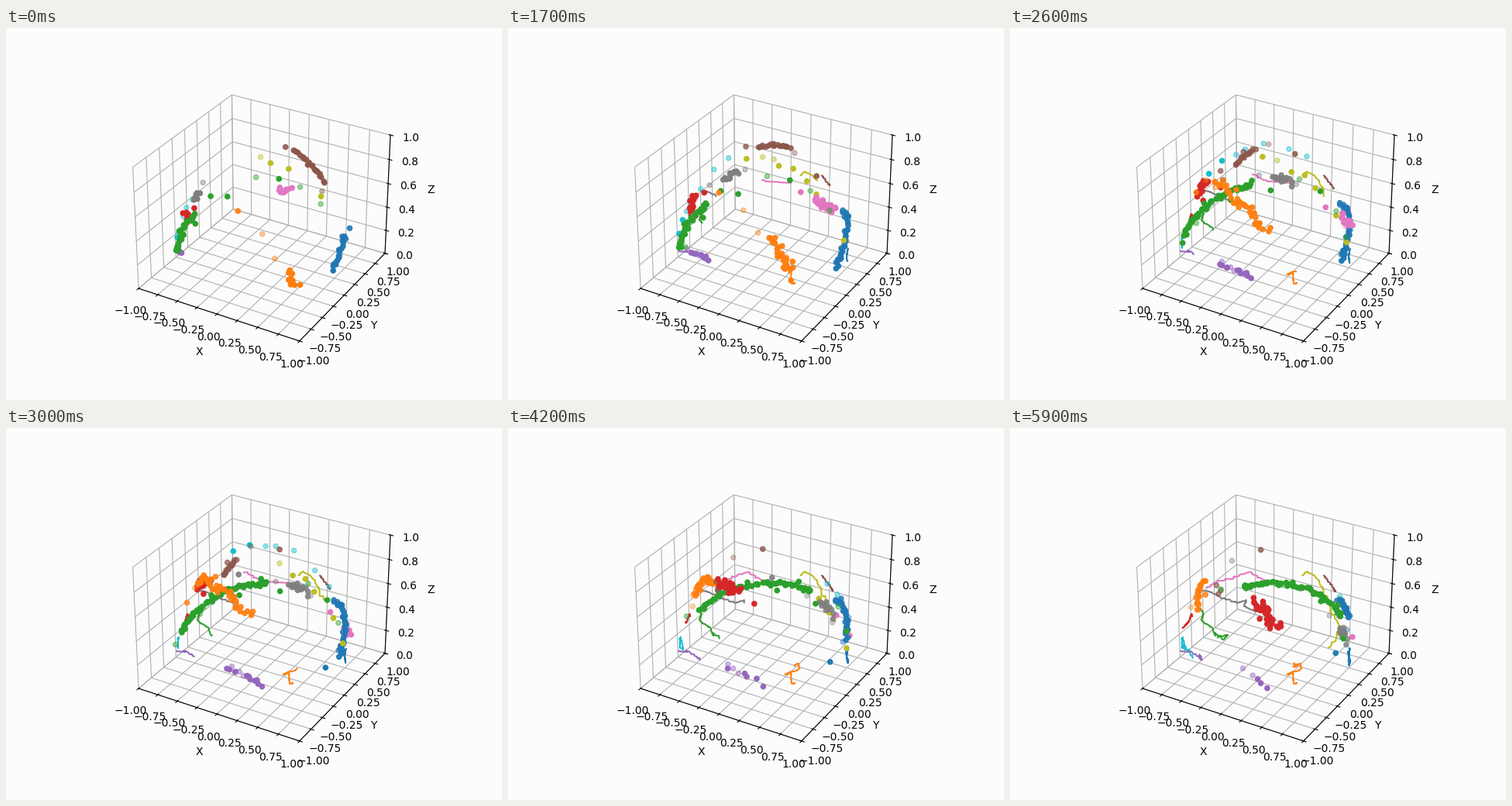
These frames come from a looping animation (640 by 480 pixels, 6 s). A matplotlib script:

```python
import numpy as np
import matplotlib.pyplot as plt
from matplotlib.animation import FuncAnimation
from matplotlib.colors import to_rgb

FRAMES = 60
PAPER = "#fcfcfc"
GOLDEN = 0.618034

# Default 3D camera: view axes, size of one data unit, pixels per view unit
ELEV, AZIM = np.radians(30), np.radians(-60)
EYE = np.array([np.cos(ELEV) * np.cos(AZIM), np.cos(ELEV) * np.sin(AZIM), np.sin(ELEV)])
RIGHT = np.array([-np.sin(AZIM), np.cos(AZIM), 0])
UP = np.cross(EYE, RIGHT)
UNIT = np.array([2, 2, 3]) * 1.90569 / np.sqrt(41)
ZOOM, CX, CY = 1997.8, 333.0, 237.4


def to_sphere(xy):
    """Lift stage points onto the near side of the unit sphere."""
    a = (xy[:, :1] - CX) / ZOOM
    b = (CY - xy[:, 1:]) / ZOOM
    ray = (a * RIGHT + b * UP - EYE) / UNIT
    start = 10 * EYE / UNIT + [0, 0, 0.5]
    qa = (ray ** 2).sum(1)
    qb = ray @ start
    root = np.sqrt(np.maximum(qb ** 2 - qa * (start @ start - 1), 0))
    q = start - ((qb + root) / qa)[:, None] * ray
    return q / np.linalg.norm(q, axis=1, keepdims=True)


def over_loop(values, f):
    """Value at frame f of keys spaced evenly over the loop."""
    return np.interp(f, np.linspace(0, FRAMES - 1, len(values)), values)


def curve(points, s):
    """Smooth curve that passes waypoint k at s = k."""
    p = np.vstack([2 * points[0] - points[1], points, 2 * points[-1] - points[-2]])
    i = np.minimum(s.astype(int), len(points) - 2)
    t = (s - i)[:, None]
    a, b, c, d = (p[i + k] for k in range(4))
    return b + t / 2 * (c - a + t * (2 * a - 5 * b + 4 * c - d + t * (3 * (b - c) + d - a)))


class Cloud:
    """Dots of one colour that slide along a path, with a wandering trail.

    tail, head: ends of the strand in waypoints, over the loop
    count, spread: number of dots and their scatter in pixels, over the loop
    loose, reach: stray dots and how many waypoints they run ahead (or behind)
    fade: opacity at the two ends of the path; faint: share of far, pale dots
    """

    def __init__(self, color, path, tail, head, count, trail, spread=(1.5,),
                 loose=0, reach=0, fade=(1, 1), faint=0.04):
        rng = np.random.default_rng(int(color[1]) + 3)
        self.color, self.path = color, np.array(path, float)
        self.tail, self.head, self.count, self.spread = tail, head, count, spread
        self.fade, self.loose = fade, loose
        self.lag = reach * (1.5 * (np.arange(loose) + 0.5) / max(loose, 1) - 0.5)
        total = loose + max(count)
        self.noise = np.clip(rng.normal(size=(total, 2)), -1.8, 1.8)
        pale = rng.random(total) < np.where(np.arange(total) < loose, 0.45, faint)
        self.alpha = np.where(pale, 0.45, 1)

        # x and y advance in their own uneven steps, which makes stairs
        steps = np.arange(FRAMES) + rng.uniform(-1.6, 1.6, (2, FRAMES))
        walk = [over_loop(v, np.sort(s)) for v, s in zip(np.transpose(trail), steps)]
        self.walk = to_sphere(np.column_stack(walk) + rng.normal(0, 0.25, (FRAMES, 2)))
        self.line, = ax.plot([], [], [], color=color)

    def dots(self, f):
        tail, head, n, spread = (over_loop(v, f) for v in
                                 (self.tail, self.head, self.count, self.spread))
        n = int(round(n))
        strand = tail + (head - tail) * ((0.3 + np.arange(n) * GOLDEN) % 1)
        s = np.r_[(tail + head) / 2 + self.lag, strand]
        scatter = np.r_[np.full(self.loose, spread + 4), np.full(n, spread)]
        end = len(self.path) - 1
        on = (s >= 0) & (s <= end)
        xy = curve(self.path, s[on]) + (self.noise[:len(s)] * scatter[:, None])[on]
        alpha = self.alpha[:len(s)][on] * np.interp(s[on], [0, end], self.fade)
        rgb = np.tile(to_rgb(self.color), (len(xy), 1))
        return to_sphere(xy), np.column_stack([rgb, alpha])


fig = plt.figure(figsize=(6.4, 4.8), dpi=100, facecolor=PAPER)
ax = fig.add_subplot(projection="3d", facecolor=PAPER)
for axis in (ax.xaxis, ax.yaxis, ax.zaxis):
    axis.set_pane_color(PAPER)
ax.set(xlim=(-1, 1), ylim=(-1, 1), zlim=(0, 1), xlabel="X", ylabel="Y", zlabel="Z")

blue = Cloud(
    "C0", [(422, 311), (430, 292), (437, 265), (436, 240), (424, 220)],
    tail=(0, 0, 0.9, 1.9, 2.9), head=(2, 3.2, 4, 4, 4), count=(18, 34, 32, 24),
    loose=4, reach=-3, fade=(1, 0.8),
    trail=[(439, 284), (437, 294), (438, 303), (436, 288), (439, 302), (437, 307),
           (438, 284)])

orange = Cloud(
    "C1", [(372, 332), (352, 290), (318, 245), (283, 211), (256, 195), (243, 212),
           (243, 240)],
    tail=(0, 0.2, 2, 3.7, 4.3), head=(0.45, 0.9, 4.5, 5.3, 5.9), count=(11, 42, 20),
    spread=(1.8, 3.5, 1.5), loose=5, reach=2.4, fade=(1, 0.75),
    trail=[(371, 329), (366, 330), (365, 314), (357, 318), (376, 311), (375, 304),
           (365, 308), (372, 306), (366, 304)])

green = Cloud(
    "C2", [(221, 288), (230, 258), (252, 232), (285, 211), (322, 202), (360, 202),
           (396, 214), (425, 240), (440, 275)],
    tail=(0, 0, 0.8, 2, 3.5), head=(1.7, 1.8, 4.4, 6.2, 7.2), count=(26, 60, 62),
    loose=11, reach=6,
    trail=[(246, 233), (250, 241), (247, 246), (258, 256), (266, 268), (264, 264),
           (276, 273), (281, 267), (268, 270)])

red = Cloud(
    "C3", [(234, 249), (238, 224), (254, 199), (285, 203), (318, 223), (345, 256)],
    tail=(0, 0.4, 1.6, 2.8, 4), head=(0.4, 1.1, 2.3, 3.6, 5), count=(13, 16, 38),
    spread=(1.3, 2, 5), loose=3, reach=1,
    trail=[(235, 243), (234, 240), (231, 249), (229, 252), (223, 258)])

purple = Cloud(
    "C4", [(222, 288), (248, 293), (276, 307), (306, 318), (334, 333)],
    tail=(0, 0.3, 2.4, 1.8, 3), head=(0.1, 1, 4, 4, 4), count=(4, 12, 13, 5, 3),
    spread=(0.8, 2, 3), loose=2, reach=-1,
    trail=[(220, 288), (232, 289), (229, 287), (242, 294), (248, 299), (244, 292),
           (246, 299)])

brown = Cloud(
    "C5", [(428, 240), (411, 200), (392, 174), (368, 156), (341, 151), (310, 160),
           (284, 185), (268, 215)],
    tail=(1, 2.7, 5.4, 6.7, 6.7), head=(3, 4.4, 6.2, 7, 7), count=(22, 18, 15, 7, 2),
    spread=(0.8,), loose=4, reach=-3, fade=(1, 0.65),
    trail=[(405, 190), (417, 206), (419, 210), (420, 211)])

pink = Cloud(
    "C6", [(352, 208), (380, 209), (406, 226), (430, 241), (446, 268)],
    tail=(0, 1.25, 3.4, 4, 4), head=(0.55, 2.4, 4, 4, 4), count=(10, 30, 8, 0, 1),
    spread=(2.5,), loose=1, reach=-4,
    trail=[(367, 200), (332, 198), (309, 186), (268, 198), (253, 206)])

grey = Cloud(
    "C7", [(243, 221), (262, 203), (292, 190), (326, 188), (360, 199), (392, 215),
           (418, 240), (434, 275)],
    tail=(0, 1.1, 4.1, 5.6, 6.5), head=(0.4, 1.7, 4.9, 6.3, 7), count=(8, 17, 15),
    spread=(2, 3.5), loose=3, reach=-3, fade=(1, 0.8),
    trail=[(250, 210), (261, 212), (272, 218), (293, 226), (305, 222), (302, 230),
           (318, 237)])

olive = Cloud(
    "C8", [(300, 170), (330, 167), (362, 181), (394, 207), (418, 246), (437, 296)],
    tail=(0.4, 0, 1, 2.8, 4.2), head=(3.6, 5, 5, 5, 4.5), count=(4, 9, 6, 3, 1),
    spread=(3,), faint=0.3,
    trail=[(377, 190), (384, 185), (396, 192), (402, 205), (411, 223), (414, 237),
           (425, 255), (420, 274), (411, 283)])

cyan = Cloud(
    "C9", [(222, 284), (225, 248), (243, 214), (274, 173), (322, 151), (378, 162),
           (425, 215)],
    tail=(0, 0, 3.4, 6, 6), head=(2, 3, 6, 6, 6), count=(5, 7, 7, 1, 1),
    spread=(2,), faint=0.5,
    trail=[(222, 284), (222, 277), (222, 272), (223, 270), (226, 286), (222, 279),
           (238, 297)])

clouds = [blue, orange, green, red, purple, brown, pink, grey, olive, cyan]
shown = []


def draw(f):
    while shown:
        shown.pop().remove()
    for cloud in clouds:
        cloud.line.set_data_3d(*cloud.walk[:f + 1].T)
        spots, colors = cloud.dots(f)
        if len(spots):
            shown.append(ax.scatter(*spots.T, c=colors, depthshade=False))
    return shown


anim = FuncAnimation(fig, draw, frames=FRAMES, init_func=lambda: [], interval=100,
                     repeat=True, repeat_delay=0, blit=False)
plt.show()
```
